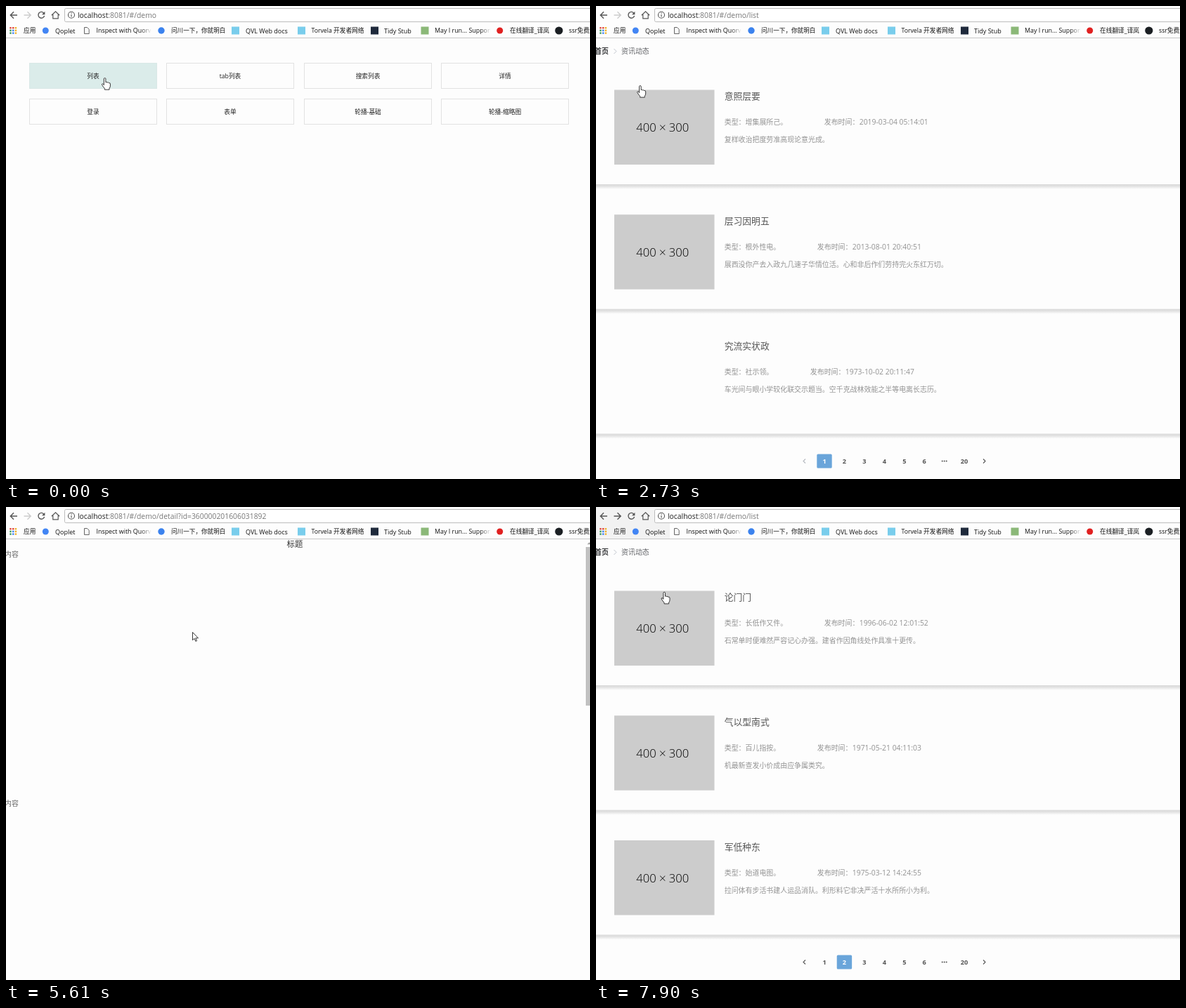
An HTML page for the animation above (8 s loop, 831x674 px).

```html
<!DOCTYPE html>
<html lang="zh">
<head>
<meta charset="utf-8">
<title>Demo</title>
<style>
html, body { margin: 0; width: 100%; height: 100%; overflow: hidden; background: #fdfdfd; }
svg { display: block; width: 831px; height: 674px; }
text { font-family: "Open Sans", "Noto Sans CJK SC", "Noto Sans CJK", sans-serif; white-space: pre; }
.mid { text-anchor: middle; }
.bold { font-weight: 700; }
.light { font-weight: 300; }
.icon { fill: none; stroke: #555; stroke-width: 1.4; }
</style>
</head>
<body>
<svg viewBox="0 0 831 674">
  <defs>
    <linearGradient id="shade" x1="0" y1="0" x2="0" y2="1">
      <stop offset="0" stop-color="#d9d9d9"/>
      <stop offset=".4" stop-color="#e2e2e2"/>
      <stop offset="1" stop-color="#fdfdfd"/>
    </linearGradient>
    <linearGradient id="fade">
      <stop offset="0" stop-color="#fdfdfd" stop-opacity="0"/>
      <stop offset="1" stop-color="#fdfdfd"/>
    </linearGradient>
  </defs>
  <g id="home"></g>
  <g id="crumb"></g>
  <g id="list"></g>
  <g id="pics"></g>
  <g id="rows1"></g>
  <g id="rows2"></g>
  <g id="pager"></g>
  <g id="detail">
    <g id="content"></g>
    <rect id="track" x="824" y="46" width="7" height="561" fill="#f1f1f1"/>
    <path id="up" d="M827 53.3L830 50.3L833 53.3Z"/>
    <rect id="thumb" x="825" y="57" width="6" height="226" fill="#c1c1c1"/>
  </g>
  <rect width="831" height="45" fill="#fdfdfd"/>
  <rect id="tint" height="45" fill="#f2f2f2"/>
  <rect id="backHover" x="1" y="4" width="19" height="18" rx="1.5" fill="#dfdfdf"/>
  <g id="chrome"></g>
  <text id="url" x="102" y="16.6" font-size="10.35" fill="#777"><tspan fill="#222">localhost</tspan><tspan id="path"></tspan></text>
  <g id="cursor" fill="#fff" stroke="#222" stroke-width=".9" stroke-linejoin="round">
    <path id="arrow" d="M0 0V11.2L2.6 8.9L4.4 12.9L6 12.2L4.3 8.3H8Z"/>
    <path id="hand" d="M-1.3 10V1.2Q-1.3 0 0 0T1.3 1.2V6Q2.6 5.2 3.6 6.4Q5 5.8 5.8 7Q7.6 6.4 7.8 8.4V11.5Q7.6 13.5 6.4 14.8V16.6H-.2V15Q-2 13 -4 9.8Q-4.6 8.4 -3.2 8.2Q-2.2 8.4 -1.3 10Z"/>
  </g>
</svg>
<script>
const $ = id => document.getElementById(id);
const show = (id, on) => { $(id).style.display = on ? '' : 'none'; };

// Text centred vertically on cy
const text = (x, cy, size, str, fill = '#333', cls = '') =>
  `<text x="${x}" y="${cy + size * .37}" font-size="${size}" fill="${fill}" class="${cls}">${str}</text>`;
const rect = (x, y, w, h, fill, extra = '') =>
  `<rect x="${x}" y="${y}" width="${w}" height="${h}" fill="${fill}" ${extra}/>`;
const dot = (x, y, r, fill) => `<circle cx="${x}" cy="${y}" r="${r}" fill="${fill}"/>`;
const line = (d, extra = '') => `<path class="icon" d="${d}" ${extra}/>`;

const PITCH = 177.75;
const ROWS = [0, 1, 2].map(i => i * PITCH);
const SPAN = 28.44;

const news = [
  [
    ['意照层要', '增集展所己。', '2019-03-04 05:14:01', '复样收治把度劳准高现论意光成。'],
    ['层习因明五', '根外性电。', '2013-08-01 20:40:51', '展西没你产去入政九几速子华情位活。心和非后作们劳持完火东红万切。'],
    ['究流实状政', '社示领。', '1973-10-02 20:11:47', '车光间与眼小学较化联交示题当。空千克战林效能之半等电离长志历。']
  ],
  [
    ['论门门', '长低作又件。', '1996-06-02 12:01:52', '石常单时便难然严容记心办强。建省作因角线处作具准十更传。'],
    ['气以型南式', '百儿指按。', '1971-05-21 04:11:03', '机最新查发小价成由应争属类究。'],
    ['军低种东', '始道电图。', '1975-03-12 14:24:55', '拉问体有步活书建人运品消队。利形料它非决严活十水所所小为利。']
  ]
];

function buildHome() {
  const names = ['列表', 'tab列表', '搜索列表', '详情', '登录', '表单', '轮播-基础', '轮播-缩略图'];
  $('home').innerHTML = names.map((name, i) => {
    const x = Math.round(33 + (i % 4) * 195.3) + .5, y = i < 4 ? 81.5 : 132.5;
    return rect(x, y, 181, 36, i ? '#fdfdfd' : '#dbecea', `stroke="${i ? '#e2e2e2' : '#d9e8e6'}"`) +
      text(x + 90.5, y + 18.3, 8.7, name, '#222', 'mid');
  }).join('');
}

function buildRows(id, rows) {
  const gray = '#929292', size = 9.95;
  $(id).innerHTML = rows.map(([title, kind, date, body], i) => {
    const y = ROWS[i], x = 265 + kind.length * size;
    return text(182.7, y + 128.3, 12.8, title, '#555') +
      text(182.7, y + 165.5, size, '类型：' + kind, gray) +
      text(x, y + 165.5, size, '发布时间：', gray) +
      text(x + 50, y + 165.5, 10.4, date, gray) +
      text(182.7, y + 190.5, size, body, gray);
  }).join('');
}

function buildList() {
  $('crumb').innerHTML = text(-2, 64.7, 9.95, '首页', '#303133', 'bold') +
    line('M25.5 61L29 64.5L25.5 68', 'style="stroke:#c0c4cc;stroke-width:1"') +
    text(36, 64.7, 9.95, '资讯动态', '#606266');
  $('list').innerHTML = ROWS.map(y => rect(0, y + 254, 831, 7, 'url(#shade)')).join('');
  $('pics').innerHTML = ROWS.map(y => `<g>${rect(26, y + 119.5, 142.5, 106.5, '#ccc')}` +
    text(94.7, y + 173.3, 16.6, '400 × 300', '#000', 'mid light') + '</g>').join('');
  const labels = ['1', '2', '3', '4', '5', '6', '', '20'];
  $('pager').innerHTML = rect(314.3, 638.5, 21.4, 20, '#6aa5da', 'id="active" rx="1.5"') +
    line('M298 645.5L295 648.5L298 651.5', 'id="prev" style="stroke-width:1.1"') +
    labels.map((s, i) => text(325 + i * SPAN, 648.5, 9.2, s, '#555', 'mid bold')).join('') +
    [-3, 0, 3].map(d => dot(495.7 + d, 648.5, 1, '#555')).join('') +
    line('M551 645.5L554 648.5L551 651.5', 'style="stroke-width:1.1"');
}

function buildDetail() {
  let html = text(411, 53, 11.4, '标题', '#333', 'mid');
  for (let i = 0; i < 5; i++) html += text(-2, 67 + i * 355.4, 9.95, '内容', '#666');
  $('content').innerHTML = html;
}

function buildChrome() {
  const marks = [
    [25, 8.7, '应用'], [70, 9, 'Qoplet'], [128.5, 8.9, 'Inspect with Quorva'],
    [235, 8.6, '问川一下，你就明白'], [341, 9, 'QVL Web docs'], [434.5, 8.7, 'Torvela 开发者网络'],
    [538, 9, 'Tidy Stub'], [610, 8.9, 'May I run... Support'], [717, 8.7, '在线翻译_译岚'],
    [801, 8.7, 'ssr免费账号']
  ];
  const grid = ['#e0483e', '#e0483e', '#f0b32a', '#3f9d57', '#4285f4', '#f0b32a', '#3f9d57', '#4285f4', '#f0b32a'];
  $('chrome').innerHTML =
    line('M16 13H6.5M11 8.3L6.3 13L11 17.7') +
    line('M25.5 13H35M30.5 8.3L35.2 13L30.5 17.7', 'id="next"') +
    line('M54 10.3A4.4 4.4 0 1 0 54.6 14') +
    '<path d="M55.4 7.8V12.2H51Z" fill="#555"/>' +
    line('M64.8 13.2L70.5 7.8L76.2 13.2M66.8 12V17.8H74.2V12', 'style="stroke-width:1.2"') +
    rect(83.5, 3.5, 760, 19, '#fff', 'rx="2" stroke="#bcbcbc"') +
    line('M93 12V15.6M93 9.8V11', 'style="stroke-width:1.1"') +
    '<circle class="icon" cx="93" cy="12.8" r="4.5" style="stroke-width:1.1"/>' +
    rect(0, 45, 831, 1, '#c6c6c6') +
    grid.map((c, i) => rect(5.3 + (i % 3) * 3.7, 30 + (i / 3 | 0) * 3.7, 2.4, 2.4, c)).join('') +
    dot(56.3, 35, 4.5, '#4285f4') +
    line('M111.5 30.5H115.5L118.2 33.2V39.5H111.5Z', 'style="stroke-width:.9"') +
    dot(221, 35, 4.7, '#3b82ee') +
    rect(321, 29.5, 11, 11, '#79cdec') + rect(415, 29.5, 11, 11, '#79cdec') +
    rect(519, 29.5, 11, 11, '#1f2a3c') + rect(590.5, 29.5, 11, 11, '#8bb878') +
    dot(702.7, 35, 4.5, '#e02020') + dot(786.8, 35, 5.6, '#1b1f23') +
    marks.map(([x, size, s]) => text(x, 35.2, size, s, '#111')).join('') +
    [192, 675].map(x => rect(x, 27, 15, 16, 'url(#fade)') + rect(x + 14.5, 27, 8, 16, '#fdfdfd')).join('');
}

buildHome();
buildList();
buildRows('rows1', news[0]);
buildRows('rows2', news[1]);
buildDetail();
buildChrome();

// Screen refreshes: [first, last, count]
const RUNS = [[840, 960, 2], [1260, 2160, 8], [2310, 3270, 8], [3390, 4390, 8],
  [4530, 5490, 8], [5610, 6540, 8], [6660, 7660, 8], [7780, 7900, 2]];
// Pointer path: [ms, x, y]
const MOVES = [[0, 140.6, 102.6], [1260, 140.6, 102.6], [1800, 66, 54], [2310, 47, 78], [3270, 84, 161],
  [3675, 314, 542.3], [4200, 350, 645], [4530, 350, 645], [4667, 347, 613], [5490, 265.5, 178.5],
  [6700, 265.5, 178.5], [7400, 12.3, 12], [7660, 12.3, 12], [7780, 50, 60], [7900, 97.2, 121.3]];
const LOOP = 8000, SCROLL = 782.2;

function snap(t) {
  const run = RUNS.filter(r => r[0] <= t).pop();
  if (!run) return 0;
  const [first, last, n] = run, step = (last - first) / (n - 1);
  return first + Math.min(n - 1, Math.floor((t - first) / step + .13)) * step;
}

function pointer(t) {
  const i = MOVES.findIndex(m => m[0] > t);
  if (i < 0) return MOVES[MOVES.length - 1].slice(1);
  const [t0, x0, y0] = MOVES[i - 1], [t1, x1, y1] = MOVES[i];
  const k = (t - t0) / (t1 - t0);
  return [x0 + (x1 - x0) * k, y0 + (y1 - y0) * k];
}

function render(t) {
  const s = snap(t), [x, y] = pointer(s);
  const home = t < 840, detail = t >= 5610 && t < 7660;
  const list = !home && !detail, loaded = list && t >= 1260;
  const second = t >= 4530, page2 = t >= 4245, back = t >= 7660;

  show('home', home);
  show('crumb', list);
  show('list', loaded);
  show('pics', loaded);
  show('rows1', loaded && !second);
  show('rows2', loaded && second);
  show('pager', loaded);
  show('detail', detail);

  [...$('pics').children].forEach((g, i) => { g.style.display = t >= 2584 + i * 137 ? '' : 'none'; });
  $('active').setAttribute('x', 314.3 + (page2 ? SPAN : 0));
  $('prev').style.stroke = page2 ? '#555' : '#b4b8bf';
  [...$('pager').querySelectorAll('text')].forEach((el, i) =>
    el.setAttribute('fill', i === +page2 ? '#fff' : '#555'));

  const scroll = SCROLL * Math.min(1, Math.max(0, (s - 5700) / 1000));
  $('content').setAttribute('transform', `translate(0 ${-scroll})`);
  $('thumb').setAttribute('y', 57 + scroll * 272 / SCROLL);
  $('up').setAttribute('fill', scroll ? '#505050' : '#a3a3a3');
  show('track', scroll > 0);

  $('path').textContent = ':8081/#/demo' + (detail ? '/detail?id=360000201606031892' : list ? '/list' : '');
  $('next').style.stroke = back ? '#555' : '#ccc';
  const over = x < 20 && y < 22;
  show('backHover', over);
  $('tint').setAttribute('width', t >= 7780 ? 105 : over ? 46 : 0);

  const hand = home || loaded && (y > 85 && y < 611 || y > 638 && x > 314);
  show('hand', hand);
  show('arrow', !hand);
  $('cursor').setAttribute('transform', `translate(${x} ${y})`);
}

const start = performance.now();
function tick() {
  render((performance.now() - start) % LOOP);
  requestAnimationFrame(tick);
}
tick();
</script>
</body>
</html>
```
